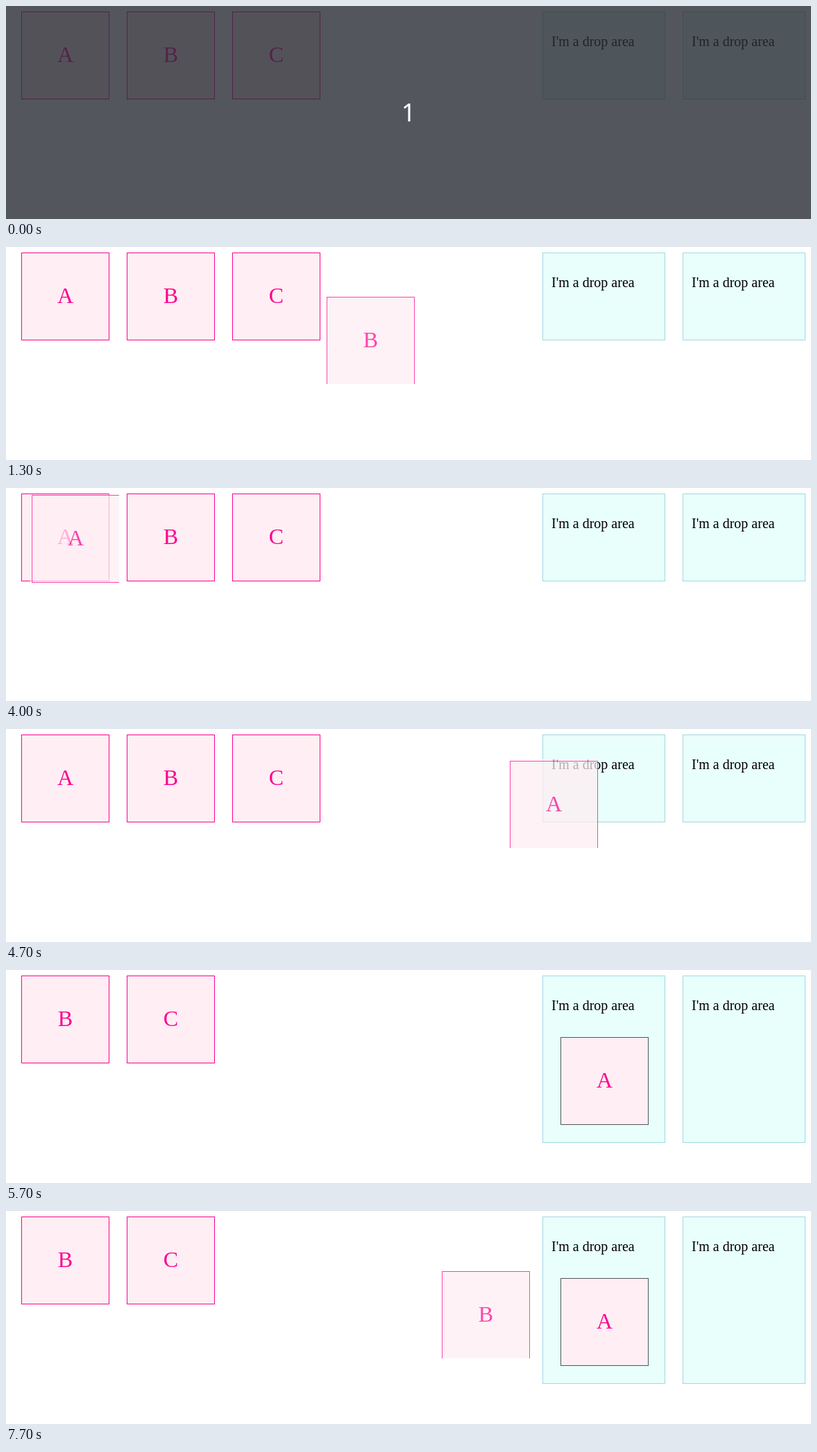
These frames come from a looping animation (1160 px wide and 308 px high, 8 s). An HTML page:

```html
<!DOCTYPE html>
<html lang="en">
<head>
<meta charset="utf-8">
<title>Drag and drop</title>
<style>
  html, body { margin: 0; width: 100%; height: 100%; overflow: hidden; background: #fff; }
  #stage { position: relative; width: 1160px; height: 308px; overflow: hidden; background: #fff; }
  #stage div { position: absolute; box-sizing: border-box; }
  .card {
    width: 127px; height: 127px;
    border: 1px solid #fb0090; background: #ffeef3; color: #fb0090;
    font: 32px/122px "Liberation Serif", "Times New Roman", serif;
    text-align: center;
  }
  .card.placed { border-color: #555; }
  .area {
    top: 8px; width: 177px; padding: 31px 0 0 12px;
    border: 1px solid #a0d9e2; background: #e8fffc; color: #000;
    font: 20px/22px "Liberation Serif", "Times New Roman", serif;
    white-space: nowrap;
  }
  #ghost { width: 128px; height: 128px; overflow: hidden; background: #fff; opacity: .73; }
  #count {
    inset: 0; background: rgba(40, 44, 52, .8); color: #fff;
    font: 36px/308px "Noto Sans", "Open Sans", sans-serif;
    text-align: center;
  }
</style>
</head>
<body>
<div id="stage"></div>
<script>
const LOOP = 8000, TICK = 100, DROP_AT = 5700, COUNT_END = 100;
const stage = document.getElementById('stage');

// Waypoints: [time, x, y]
const drags = [
  { label: 'B', end: 2300, path: [[1100, 270, 41], [1500, 653, 102], [1600, 653, 102], [1900, 801, 64]] },
  { label: 'A', end: DROP_AT, path: [[4000, 37, 10], [4200, 190, 2], [4500, 540, 22],
    [4700, 726, 46], [4800, 750, 38], [5400, 809, 19]] },
  { label: 'B', end: LOOP, path: [[7400, 84, 8], [7500, 235, 22], [7700, 628, 87]] }
];

function add(parent, className, text = '') {
  const el = document.createElement('div');
  el.className = className;
  el.textContent = text;
  parent.append(el);
  return el;
}

function place(el, x, y) {
  el.style.left = x + 'px';
  el.style.top = y + 'px';
}

function show(el, on) {
  el.style.display = on ? 'block' : 'none';
}

const areas = [773, 975].map(x => {
  const el = add(stage, 'area', "I'm a drop area");
  el.style.left = x + 'px';
  return el;
});
const cards = [...'ABC'].map(label => add(stage, 'card', label));
const ghost = add(stage, '');
ghost.id = 'ghost';
const ghostCard = add(ghost, 'card');
const count = add(stage, '', '1');
count.id = 'count';

function pointAt(path, t) {
  const next = path.findIndex(p => p[0] > t);
  if (next < 0) return path[path.length - 1].slice(1);
  const [t0, x0, y0] = path[next - 1], [t1, x1, y1] = path[next];
  const k = (t - t0) / (t1 - t0);
  return [Math.round(x0 + (x1 - x0) * k), Math.round(y0 + (y1 - y0) * k)];
}

function drawGhost(t) {
  const drag = drags.find(d => t >= d.path[0][0] && t < d.end);
  show(ghost, drag);
  if (!drag) return;
  const [x, y] = pointAt(drag.path, t);
  // The drag image crops one edge of the card: right at pickup, then bottom.
  const dx = t === drag.path[0][0] ? 2 : 1, dy = 3 - dx;
  place(ghost, x - dx, y - dy);
  place(ghostCard, dx, dy);
  ghostCard.textContent = drag.label;
}

function draw(t) {
  const dropped = t >= DROP_AT;
  cards.forEach((card, i) => place(card, 22 + 152 * (dropped ? i - 1 : i), 8));
  if (dropped) place(cards[0], 799, 97);
  cards[0].classList.toggle('placed', dropped);
  areas.forEach(area => area.style.height = (dropped ? 242 : 127) + 'px');
  drawGhost(t);
  show(count, t < COUNT_END);
}

const start = performance.now();
function frame() {
  const t = (performance.now() - start) % LOOP;
  draw(Math.floor(t / TICK) * TICK);
  requestAnimationFrame(frame);
}
frame();
</script>
</body>
</html>
```
